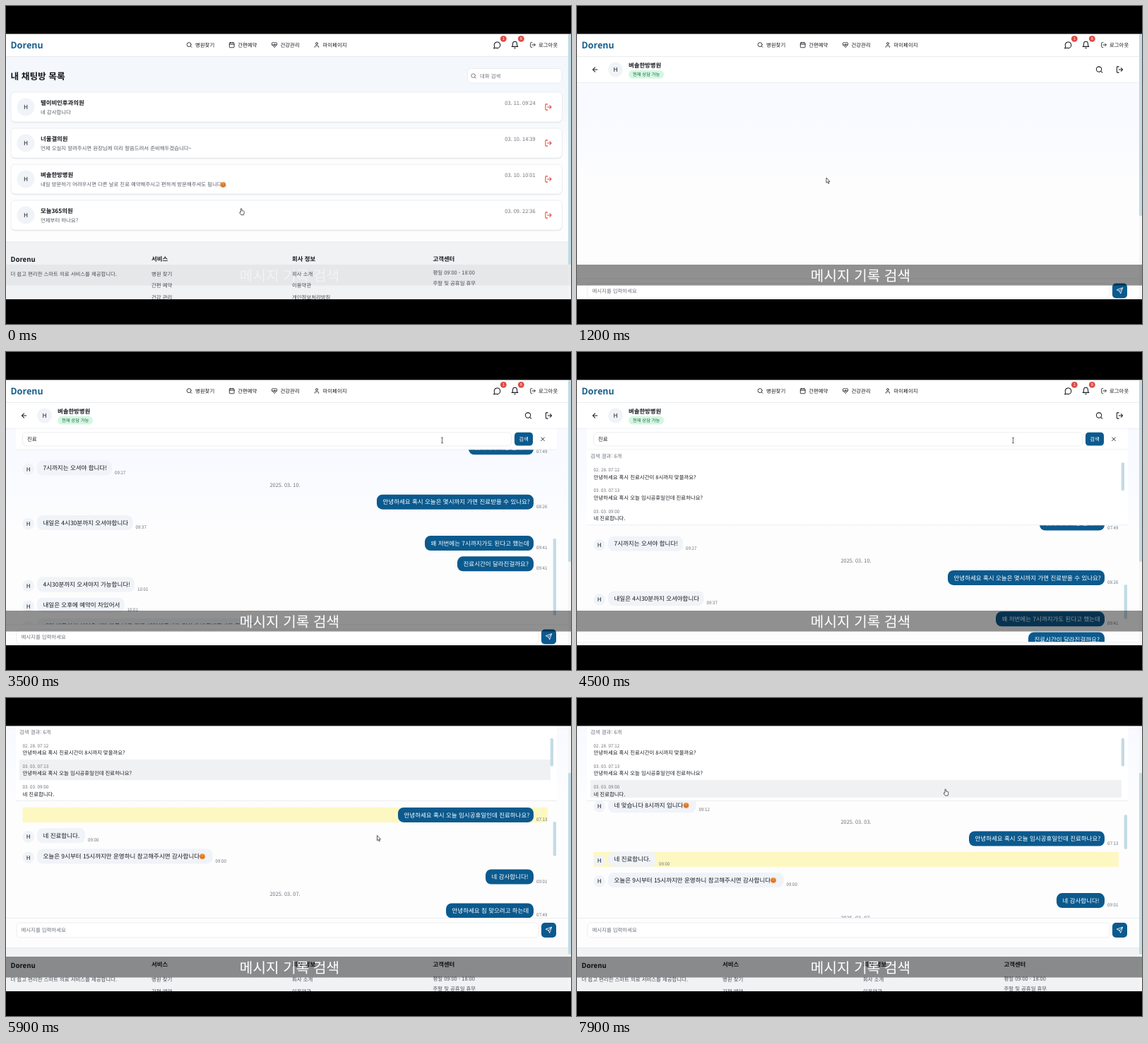
An HTML page for the animation above (8000 ms loop, 800x450 px).

```html
<!DOCTYPE html>
<html lang="ko">
<head>
<meta charset="utf-8">
<title>메시지 기록 검색</title>
<style>
html, body { margin: 0; width: 100%; height: 100%; overflow: hidden; background: #000; }
svg { display: block; width: 800px; height: 450px; }
text { font-family: "Noto Sans CJK KR", "Noto Sans CJK", "Noto Sans", sans-serif; text-rendering: geometricPrecision; white-space: pre; }
</style>
</head>
<body>
<svg id="stage" viewBox="0 0 800 450" xmlns="http://www.w3.org/2000/svg"></svg>
<script>
const LOOP = 8000;
const BLUE = '#0b5a8e', INK = '#15181e', GRAY = '#6d727a', LINE = '#e6e9ed', PALE = '#f0f3f7', THUMB = '#c3dbe5';
const CONTENT_HEIGHT = 565;

// Markup helpers
const text = (s, x, y, { size = 7.4, fill = INK, weight = 400, anchor = 'start', id = '' } = {}) =>
  `<text ${id && `id="${id}"`} x="${x}" y="${y + size * 0.37}" font-size="${size}" fill="${fill}" font-weight="${weight}" text-anchor="${anchor}">${s}</text>`;
const rect = (x, y, w, h, fill, r = 0, extra = '') =>
  `<rect x="${x}" y="${y}" width="${w}" height="${h}" rx="${r}" fill="${fill}" ${extra}/>`;
const outlined = (x, y, w, h, r, fill = '#fff') => rect(x, y, w, h, fill, r, `stroke="${LINE}" stroke-width=".8"`);
const rule = (y, x1 = 0, x2 = 796) => rect(x1, y, x2 - x1, 0.8, LINE);
const group = (id, body, extra = '') => `<g id="${id}" ${extra}>${body}</g>`;
const avatar = (x, y, r, size) =>
  `<circle cx="${x}" cy="${y}" r="${r}" fill="${PALE}"/>` + text('H', x, y, { size, anchor: 'middle', weight: 500 });

const ICONS = {
  search: 'M19 11a8 8 0 1 1-16 0a8 8 0 1 1 16 0M21 21l-4.3-4.3',
  calendar: 'M5 4h14a2 2 0 0 1 2 2v14a2 2 0 0 1-2 2H5a2 2 0 0 1-2-2V6a2 2 0 0 1 2-2zM16 2v4M8 2v4M3 10h18',
  heart: 'M19 14c1.5-1.5 3-3.2 3-5.5A5.5 5.5 0 0 0 16.5 3c-1.8 0-3 .5-4.5 2-1.5-1.5-2.7-2-4.5-2A5.5 5.5 0 0 0 2 8.5c0 2.3 1.5 4 3 5.5l7 7ZM3.2 12h6.3l.5-1 2 4.5 2-7 1.5 3.5h5.3',
  user: 'M19 21v-2a4 4 0 0 0-4-4H9a4 4 0 0 0-4 4v2M16 7a4 4 0 1 1-8 0a4 4 0 1 1 8 0',
  chat: 'M7.9 20A9 9 0 1 0 4 16.1L2 22Z',
  bell: 'M6 8a6 6 0 0 1 12 0c0 7 3 9 3 9H3s3-2 3-9M10.3 21a2 2 0 0 0 3.4 0',
  leave: 'M9 21H5a2 2 0 0 1-2-2V5a2 2 0 0 1 2-2h4M16 17l5-5-5-5M21 12H9',
  back: 'M12 19l-7-7 7-7M19 12H5',
  send: 'M22 2l-7 20-4-9-9-4ZM22 2L11 13',
  close: 'M18 6L6 18M6 6l12 12'
};
const icon = (name, x, y, size = 9, color = INK) =>
  `<path d="${ICONS[name]}" transform="translate(${x - size / 2} ${y - size / 2}) scale(${size / 24})" fill="none" stroke="${color}" stroke-width="2.2" stroke-linecap="round" stroke-linejoin="round"/>`;
const smile = (x, y) => `<g transform="translate(${x} ${y})"><circle r="4" fill="#f0953f"/>
  <path d="M-2.3-.7q.8-1 1.6 0M.7-.7q.8-1 1.6 0M-1.8 1.1q1.8 1.9 3.6 0" fill="none" stroke="#7a3414" stroke-width=".7"/>
  <circle cx="-2.6" cy=".8" r=".9" fill="#e9604a"/><circle cx="2.6" cy=".8" r=".9" fill="#e9604a"/></g>`;
const badge = (x, n) => `<circle cx="${x}" cy="46.3" r="4.4" fill="#dd4a44"/>` + text(n, x, 46.3, { size: 5.8, fill: '#fff', anchor: 'middle' });

// Site header and footer
const nav = [['search', '병원찾기', 259.5], ['calendar', '간편예약', 319.7], ['heart', '건강관리', 380], ['user', '마이페이지', 440]];
const header = rect(0, 39, 796, 32, '#fff') + rule(71) +
  text('Dorenu', 6.5, 55.3, { size: 12.7, weight: 700, fill: '#16608c' }) +
  nav.map(([i, s, x]) => icon(i, x, 55) + text(s, x + 8.5, 55, { weight: 500 })).join('') +
  icon('chat', 695.5, 55.3, 11.5) + badge(704.3, '1') + icon('bell', 720.5, 55, 11.5) + badge(729.3, '8') +
  icon('leave', 746, 55) + text('로그아웃', 754, 55, { weight: 500 });

const column = (x, title, lines, first = 45.5, step = 16.6) =>
  text(title, x, 24, { size: 8.4, weight: 700 }) +
  lines.map((s, i) => text(s, x, first + i * step, { fill: '#4a4f57' })).join('');
const footer = rect(0, 0, 796, 140, '#f0f2f3') + rule(0) +
  text('Dorenu', 6.5, 25, { size: 9.7, weight: 700 }) +
  text('더 쉽고 편리한 스마트 의료 서비스를 제공합니다.', 6.5, 45.5, { fill: '#4a4f57' }) +
  column(206, '서비스', ['병원 찾기', '간편 예약', '건강 관리']) +
  column(405, '회사 정보', ['회사 소개', '이용약관', '개인정보처리방침']) +
  column(604.5, '고객센터', ['평일 09:00 - 18:00', '주말 및 공휴일 휴무'], 44, 14.7);

// Room list
const rooms = [
  ['텔이비인후과의원', '네 감사합니다', '03. 11. 09:24'],
  ['너울결의원', '언제 오실지 알려주시면 원장님께 미리 말씀드려서 준비해두겠습니다~', '03. 10. 14:39'],
  ['벼솔한방병원', '내일 방문하기 어려우시면 다른 날로 진료 예약해주시고 편하게 방문해주셔도 됩니다', '03. 10. 10:01'],
  ['모늘365의원', '언제부터 하나요?', '03. 09. 22:36']
];
const roomCard = ([name, last, date], i) => {
  const y = 143 + 51 * i;
  return rect(7, y - 20, 780.5, 42.5, '#e9ecf0', 6) + outlined(7, y - 21, 780.5, 42, 6) + avatar(28, y, 12.5, 8.4) +
    text(name, 49, y - 6, { size: 8.4, weight: 700 }) + text(last, 49, y + 7.7, { fill: '#555b64' }) +
    (i === 2 ? smile(307.5, y + 8) : '') +
    text(date, 749.5, y - 5.5, { fill: GRAY, anchor: 'end' }) + icon('leave', 768, y, 11, '#d9473c');
};
const roomList = rect(0, 71, 796, 265, 'url(#sky)') +
  text('내 채팅방 목록', 6.5, 99, { size: 12.7, weight: 700 }) +
  outlined(653.5, 88.5, 133.5, 20.5, 5) + icon('search', 662, 99, 8.5, '#555b64') +
  text('대화 검색', 671, 99, { fill: GRAY }) + rooms.map(roomCard).join('');

// Messages: kind, center y, text, time, free edge of the bubble, smile x
const messages = [
  ['date', 20.5, '2025. 02. 28.'],
  ['mine', 44, '안녕하세요 혹시 진료시간이 8시까지 맞을까요?', '07:12', 566],
  ['theirs', 73.5, '네 맞습니다 8시까지 입니다', '09:12', 168.5, 154.5],
  ['date', 97, '2025. 03. 03.'],
  ['mine', 120.7, '안녕하세요 혹시 오늘 임시공휴일인데 진료하나요?', '07:13', 555],
  ['theirs', 150, '네 진료합니다.', '09:00', 112],
  ['theirs', 179.3, '오늘은 9시부터 15시까지만 운영하니 참고해주시면 감사합니다', '09:00', 292.5, 278],
  ['mine', 208.3, '네 감사합니다!', '09:01', 679],
  ['date', 233, '2025. 03. 07.'],
  ['mine', 256.2, '안녕하세요 침 맞으려고 하는데', '07:49', 623],
  ['mine', 285, '몇시까지 가면 될까요?', '07:49', 655],
  ['theirs', 314.3, '7시까지는 오셔야 합니다!', '09:27', 150],
  ['date', 338.5, '2025. 03. 10.'],
  ['mine', 362.4, '안녕하세요 혹시 오늘은 몇시까지 가면 진료받을 수 있나요?', '08:26', 525],
  ['theirs', 391.7, '내일은 4시30분까지 오셔야합니다', '09:37', 179.5],
  ['mine', 420.8, '왜 저번에는 7시까지가도 된다고 했는데', '09:41', 593],
  ['mine', 450, '진료시간이 달라진걸까요?', '09:41', 639],
  ['theirs', 479.3, '4시30분까지 오셔야지 가능합니다!', '10:01', 182],
  ['theirs', 508.4, '내일은 오후에 예약이 차있어서', '10:01', 167.5],
  ['theirs', 537.7, '내일 방문하기 어려우시면 다른 날로 진료 예약해주시고 편하게 방문해주셔도 됩니다', '10:01', 362, 348]
];
const message = ([kind, y, s, time, edge, face]) => {
  if (kind === 'date') return text(s, 395, y, { fill: GRAY, anchor: 'middle' });
  const stamp = x => text(time, x, y + 6.3, { size: 6.2, fill: GRAY });
  if (kind === 'mine')
    return rect(edge, y - 10.5, 747 - edge, 21, BLUE, 8) + text(s, edge + 8.5, y, { size: 8.5, fill: '#fff' }) + stamp(751);
  return avatar(31.7, y + 1.7, 8.3, 8) + rect(44, y - 10.5, edge - 44, 21, PALE, 8) +
    text(s, 52.5, y, { size: 8.5 }) + (face ? smile(face, y + 0.3) : '') + stamp(edge + 4);
};

// Chat room
const chatHeader = rect(0, 72, 796, 36, '#fff') + rule(107.8) + icon('back', 25.5, 90, 11) + avatar(54.5, 90, 10.5, 8.4) +
  text('벼솔한방병원', 73, 84.2, { size: 8.4, weight: 700 }) +
  rect(73, 91, 50, 11.6, '#d3f7e1', 5.8) + text('현재 상담 가능', 79, 96.7, { size: 6.3, fill: '#256344', weight: 500 }) +
  rect(729, 79.5, 21, 21, '#eff1f3', 5, 'id="searchHover"') + icon('search', 739.5, 90, 11) + icon('leave', 768.5, 90, 11);

const searchBar = rect(14, 108.6, 766, 29.4, '#fff') + outlined(23.5, 113.8, 692, 19.2, 5) +
  text('', 30, 123.5, { id: 'query' }) +
  rect(720, 113.8, 26, 18.8, BLUE, 4.5) + text('검색', 733, 123.3, { fill: '#fff', anchor: 'middle', weight: 500 }) +
  icon('close', 760, 123.3, 9.5) + rule(137.6, 14, 780);

const hits = [['02. 28. 07:12', messages[1][2]], ['03. 03. 07:13', messages[4][2]], ['03. 03. 09:00', messages[5][2]]];
const results = rect(14, 138.2, 766, 107, '#fff') + text('검색 결과: 6개', 19, 147.5, { fill: GRAY }) +
  group('hits', rect(19, 0, 752, 29.2, '#f0f1f2', 0, 'id="hitHover"') +
    hits.map(([date, s], i) => text(date, 23.5, 166.8 + 29.2 * i, { size: 6.3, fill: GRAY }) +
      text(s, 23.5, 176.9 + 29.2 * i, { weight: 500 })).join(''), 'clip-path="url(#hitClip)"') +
  rect(770.7, 156.5, 4.3, 39.5, THUMB, 1.5) + rule(244.4, 14, 780);

const composer = rect(0, 0, 796, 42, '#fdfdfe') + rule(0) + outlined(15, 7, 739, 21, 5) +
  text('메시지를 입력하세요', 21.5, 17.6, { fill: GRAY, weight: 500 }) +
  rect(758, 7, 21, 21, BLUE, 5) + icon('send', 768.5, 17.5, 9.5, '#fff');

const chat = rect(0, 71, 796, 400, 'url(#haze)') +
  group('viewport', group('messages',
    rect(23.5, 0, 743.5, 21.5, '#fdf8c2', 0, 'id="mark"') + messages.map(message).join('')), 'clip-path="url(#listClip)"') +
  rect(774.7, 0, 4.3, 0, THUMB, 1.5, 'id="listThumb"') +
  chatHeader + group('searchBar', searchBar) + group('results', results) + group('composer', composer);

// Pointers are drawn around their center
const pointer = 'fill="#fff" stroke="#333" stroke-width=".8" stroke-linejoin="round"';
const pointers =
  `<path id="arrow" ${pointer} d="M-2-4V3.2L-.4 1.8.8 4.4 2 3.8.9 1.4H3Z"/>` +
  `<path id="hand" ${pointer} d="M-1.6 1V-4q.8-1.3 1.6 0V-1.4L2.6-.8Q3.6-.5 3.4.6L2.6 4.6H-1.2L-3.4 1.4Q-3.2 0-1.6 1Z"/>` +
  `<path id="beam" fill="none" stroke="#444" stroke-width=".8" d="M-1.5-4Q0-4 0-3Q0-4 1.5-4M0-3V3M-1.5 4Q0 4 0 3Q0 4 1.5 4"/>`;

const gradient = (id, top, y2) => `<linearGradient id="${id}" gradientUnits="userSpaceOnUse" x1="0" x2="0" y1="72" y2="${y2}">
  <stop stop-color="${top}"/><stop offset=".5" stop-color="${top}"/><stop offset="1" stop-color="#fdfdfe"/></linearGradient>`;

document.getElementById('stage').innerHTML =
  `<defs>${gradient('sky', '#f4f7fc', 210)}${gradient('haze', '#f8faff', 250)}
   <clipPath id="listClip"><rect id="listBox" width="796"/></clipPath>
   <clipPath id="hitClip"><rect y="156" width="800" height="84.5"/></clipPath></defs>` +
  rect(0, 39, 800, 377, '#fdfdfe') +
  group('page', group('roomList', roomList) + group('chat', chat) + group('footer', footer) + header) +
  rect(796, 39, 4, 377, '#f3f5f6') + rect(796, 40, 4, 257, THUMB, 1.5, 'id="pageThumb"') +
  group('caption', rect(0, 366, 800, 29.5, '#000', 0, 'opacity=".43"') +
    text('메시지 기록 검색', 401.5, 381.8, { size: 20.2, weight: 500, fill: '#fff', anchor: 'middle' })) +
  group('pointer', pointers) + rect(0, 0, 800, 39.5, '#000') + rect(0, 415, 800, 35, '#000');

// Motion
const el = Object.fromEntries([...document.querySelectorAll('[id]')].map(e => [e.id, e]));
const set = (id, attrs) => { for (const k in attrs) el[id].setAttribute(k, attrs[k]); };
const show = (id, on) => set(id, { visibility: on ? 'visible' : 'hidden', display: on ? 'inline' : 'none' });
const move = (id, x, y) => set(id, { transform: `translate(${x} ${y})` });
const clamp = v => Math.max(0, Math.min(1, v));
const ease = (t, from, to) => { const p = clamp((t - from) / (to - from)); return p * p * (3 - 2 * p); };
const latest = (steps, t) => steps.reduce((v, [at, value]) => t >= at ? value : v, steps[0][1]);

const path = [[150, 334, 291], [700, 355, 247], [1450, 355, 247], [2300, 744, 86], [2700, 744, 86], [3300, 617.5, 125],
  [4500, 617.5, 125], [5100, 527.5, 198.5], [6000, 527.5, 198.5], [6600, 522.5, 133.5]];
const pointerKind = [[0, 'hand'], [1050, 'arrow'], [2200, 'hand'], [2850, 'arrow'], [3200, 'beam'], [4700, 'arrow'], [4950, 'hand'], [5600, 'arrow'], [6300, 'hand']];
const typing = [[0, '대화 내용 검색'], [2900, 'ㅈ'], [3000, '지'], [3100, '진'], [3300, '진ㄹ'], [3400, '진료']];
const hoveredHit = [[0, -1], [4950, 1], [6100, -1], [6400, 2]];

function pointerAt(t) {
  let [, x, y] = path[0];
  for (let i = 1; i < path.length; i++) {
    const p = ease(t, path[i - 1][0], path[i][0]);
    x += (path[i][1] - path[i - 1][1]) * p;
    y += (path[i][2] - path[i - 1][2]) * p;
  }
  return [x, y];
}

function render(t) {
  const inChat = t >= 1050, searching = t >= 2650, found = t >= 3800;
  const pageScroll = 99.5 * ease(t, 5450, 5830);
  const listScroll = 288 - 249 * ease(t, 5550, 6070) + 28.2 * ease(t, 7300, 7720);
  const top = found ? 245 : searching ? 137.8 : 108;
  const bottom = found ? 410.5 : 385.5;
  const height = bottom - top;

  show('roomList', !inChat);
  show('chat', inChat);
  show('messages', t >= 1400);
  show('listThumb', t >= 1400);
  show('searchBar', searching);
  show('results', found);
  show('searchHover', t >= 2250 && t < 2800);

  move('page', 0, -pageScroll);
  move('footer', 0, !inChat ? 333.5 : found ? 452.5 : 427.5);
  move('composer', 0, bottom);
  move('messages', 0, top - listScroll);
  set('listBox', { y: top, height });
  set('listThumb', { y: top + listScroll * height / CONTENT_HEIGHT, height: height * height / CONTENT_HEIGHT });
  set('pageThumb', { y: 40 + pageScroll * 0.66, height: inChat ? 257 : 326 });

  show('mark', t >= 5500);
  set('mark', { y: messages[t < 7300 ? 4 : 5][1] - 10.7 });
  const hit = latest(hoveredHit, t);
  show('hitHover', hit >= 0);
  set('hitHover', { y: 157.3 + 29.2 * hit });

  el.query.textContent = latest(typing, t);
  set('query', { fill: t < 2900 ? GRAY : INK });
  set('caption', { opacity: 0.1 + 0.9 * clamp(t / 500) });

  const kind = latest(pointerKind, t);
  for (const id of ['arrow', 'hand', 'beam']) show(id, id === kind);
  move('pointer', ...pointerAt(t));
}

const start = performance.now();
function tick() {
  render((performance.now() - start) % LOOP);
  requestAnimationFrame(tick);
}
tick();
</script>
</body>
</html>
```
